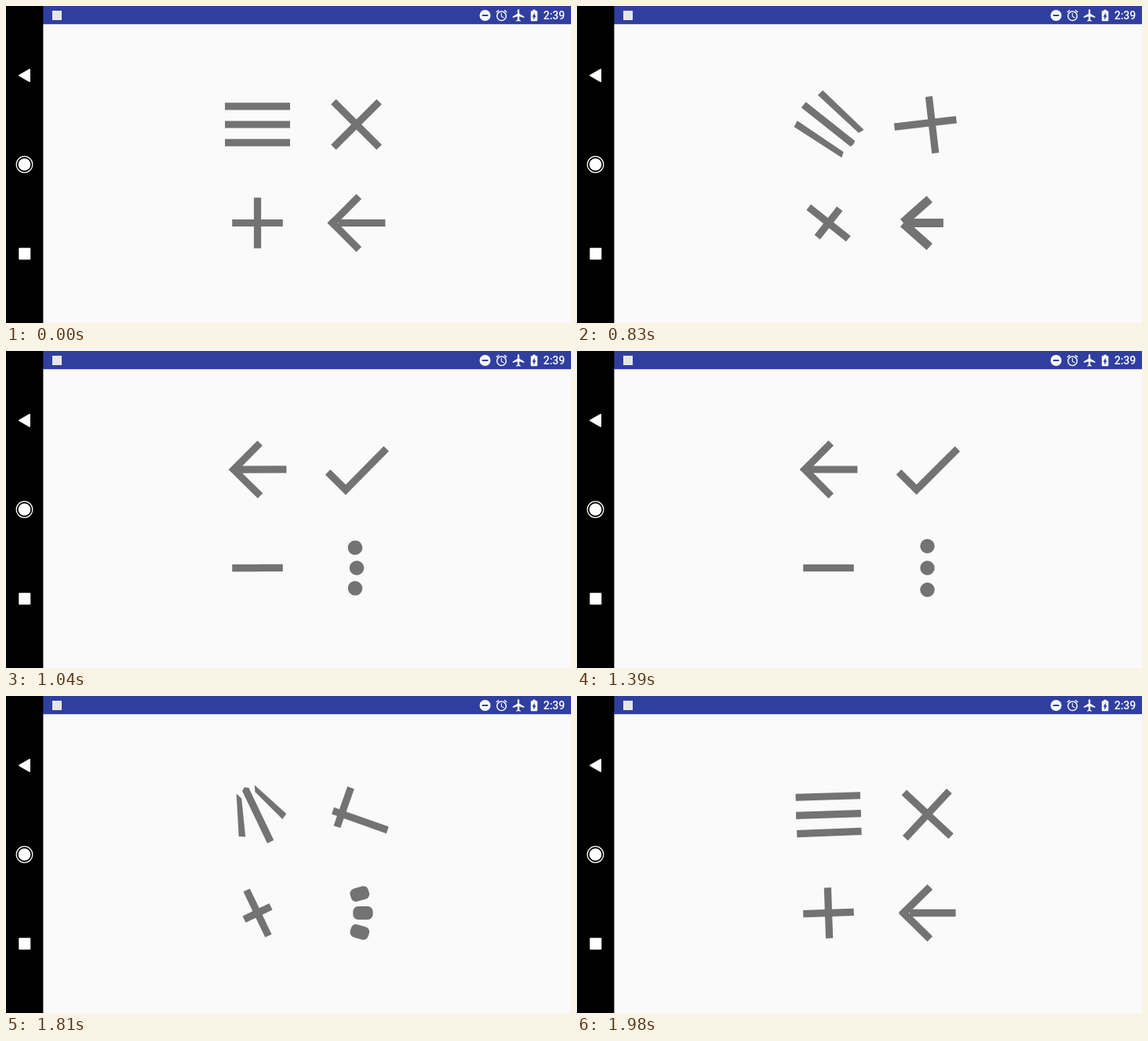
An HTML page that plays this animation: 720 px wide and 404 px high, repeating every 2010 ms.

```html
<!DOCTYPE html>
<html lang="en">
<head>
<meta charset="utf-8">
<title>Icon morphs</title>
<style>
  html, body { margin: 0; width: 100%; height: 100%; overflow: hidden; background: #fafafa; }
  svg { display: block; width: 100vw; height: 100vh; }
  text { font: 500 14px Roboto, "Open Sans", sans-serif; }
</style>
</head>
<body>
<svg viewBox="0 0 720 404" preserveAspectRatio="none">
  <rect width="720" height="404" fill="#fafafa"/>
  <rect x="47" width="673" height="23.2" fill="#303f9f"/>
  <rect width="47.4" height="404"/>

  <g fill="#fff" stroke="#fff" stroke-linejoin="round">
    <path d="M17 88.5L30 81V96Z" stroke-width="2"/>
    <circle cx="23.5" cy="202" r="10.3" fill="none" stroke-width="1.2"/>
    <circle cx="23.5" cy="202" r="7.8" stroke="none"/>
    <rect x="16.3" y="308.3" width="15" height="15" rx="1" stroke="none"/>
  </g>

  <g fill="#fff">
    <rect x="59" y="6" width="12" height="12" fill="#e6e6e6"/>
    <path fill-rule="evenodd" d="M603.5 12a7 7 0 1 0 14 0a7 7 0 1 0 -14 0ZM606.7 11h7.6v2h-7.6Z"/>
    <path transform="translate(631.5 12) scale(.72) translate(-12 -12)" d="M22 5.72l-4.6-3.86-1.29 1.53 4.6 3.86L22 5.72zM7.88 3.39L6.6 1.86 2 5.71l1.29 1.53 4.59-3.85zM12.5 8H11v6l4.75 2.85.75-1.23-4-2.37V8zM12 4c-4.97 0-9 4.03-9 9s4.02 9 9 9c4.97 0 9-4.03 9-9s-4.03-9-9-9zm0 16c-3.87 0-7-3.13-7-7s3.13-7 7-7 7 3.13 7 7-3.13 7-7 7z"/>
    <path transform="translate(653 12) scale(.77) translate(-11.5 -12)" d="M21 16v-2l-8-5V3.5c0-.83-.67-1.5-1.5-1.5S10 2.67 10 3.5V9l-8 5v2l8-2.5V19l-2 1.5V22l3.5-1 3.5 1v-1.5L13 19v-5.5l8 2.5z"/>
    <path transform="translate(673 12) scale(.85 .72) translate(-12 -12)" fill-rule="evenodd" d="M15.67 4H14V2h-4v2H8.33C7.6 4 7 4.6 7 5.33v15.33C7 21.4 7.6 22 8.33 22h7.33c.74 0 1.34-.6 1.34-1.33V5.33C17 4.6 16.4 4 15.67 4zM11 20v-5.5H9L13 7v5.5h2L11 20z"/>
    <text x="684.7" y="17">2:39</text>
  </g>

  <g fill="#737373" stroke="#737373" stroke-width="0">
    <g transform="translate(320.5 151) scale(4.61)"><path id="menu"/></g>
    <g transform="translate(446.5 151) scale(4.61)"><path id="cross" fill="none" stroke-width="2" stroke-linecap="square"/></g>
    <g transform="translate(320.5 276.5) scale(4.61)"><path id="plus"/></g>
    <g transform="translate(446.5 276.5) scale(4.61)">
      <rect id="top"/><rect id="mid"/><rect id="low"/>
    </g>
  </g>
</svg>
<script>
const LOOP = 2010, OUT = 759, BACK = 1722, SPAN = 300;
const $ = id => document.getElementById(id);
const mix = (a, b, k) => a + (b - a) * k;
const clamp = x => Math.min(1, Math.max(0, x));
const bezier = (a, b, c, d, s) => {
  const r = 1 - s;
  return r * r * r * a + 3 * r * r * s * b + 3 * r * s * s * c + s * s * s * d;
};

// fast out, slow in: cubic-bezier(.4, 0, .2, 1)
function ease(x) {
  x = clamp(x);
  if (x === 0 || x === 1) return x;
  let lo = 0, hi = 1;
  for (let i = 0; i < 24; i++) {
    const s = (lo + hi) / 2;
    if (bezier(0, .4, .2, 1, s) < x) lo = s; else hi = s;
  }
  return bezier(0, 0, 1, 1, lo);
}

// Icons live on a 24 x 24 grid; each entry is a list of x,y pairs.
const MENU = [[3,6, 3,8, 21,8, 21,6], [3,11, 3,13, 21,13, 21,12, 21,11], [3,18, 3,16, 21,16, 21,18]];
const ARROW = [[12,4, 10.59,5.41, 16.17,11, 18.99,11], [4,11, 4,13, 18.99,13, 20,12, 18.99,11],
  [12,20, 10.59,18.59, 16.17,13, 18.99,13]];
const CROSS = [[6.4,6.4, 17.6,17.6], [6.4,17.6, 17.6,6.4]];
const TICK = [[4.8,13.4, 9,17.6], [10.4,16.2, 19.6,7]];

function morph(from, to, k, end) {
  return from.map((part, i) =>
    "M" + part.map((v, j) => (mix(v, to[i][j], k) - 12).toFixed(3)).join(" ") + end).join("");
}

function setPath(id, d, angle) {
  $(id).setAttribute("d", d);
  $(id).setAttribute("transform", `rotate(${angle})`);
}

// A bar of the given length that shrinks into a dot as k goes to 1.
function setBar(id, x, y, angle, length, k) {
  const w = mix(length, 4, k), h = mix(2, 4, k), r = 2 * k * k, el = $(id);
  const box = { x: -w / 2, y: -h / 2, width: w, height: h, rx: r, ry: r,
    transform: `translate(${x} ${y}) rotate(${angle})` };
  for (const key in box) el.setAttribute(key, box[key]);
}

function draw(t) {
  const back = t >= BACK, dt = t - (back ? BACK : OUT);
  const run = ease(dt / SPAN), quick = ease(dt / 250);
  const p = back ? 1 - run : run;
  const turn = 180 * (back ? 1 + run : run);

  setPath("menu", morph(MENU, ARROW, p, "Z"), turn);
  setPath("cross", morph(CROSS, TICK, p, ""), turn - 180);
  const half = mix(7, 1, back ? 1 - quick : quick);
  setPath("plus", `M-7 -1H-1V${-half}H1V-1H7V1H1V${half}H-1V1H-7Z`, turn);

  let hx, hy, mx, k, tilt;
  if (back) {
    const v = 1 - (1 - clamp((dt + 4) / SPAN)) ** 2;
    hx = bezier(0, 5.96, -1.87, -3.3, v);
    hy = bezier(-6, -7.69, -3.6, -3.3, v);
    mx = bezier(0, 3.73, .69, 1.5, v);
    k = 1 - ease((dt - 24) / SPAN);
    tilt = 45 * run;
  } else {
    const e = ease(dt / 450), u = clamp(dt / SPAN);
    hx = mix(-3.3, 0, e);
    hy = mix(-3.3, -6, e ** 1.4);
    mx = 1.5 * (1 - e) - 18 * u * (1 - u) ** 2;
    k = run;
    tilt = 45 * (1 - e);
  }
  setBar("top", hx, hy, -tilt, 11.31, k);
  setBar("mid", mx, 0, 0, 13, k);
  setBar("low", hx, -hy, tilt, 11.31, k);
}

const start = performance.now();
function tick() {
  draw((performance.now() - start) % LOOP);
  requestAnimationFrame(tick);
}
tick();
</script>
</body>
</html>
```
